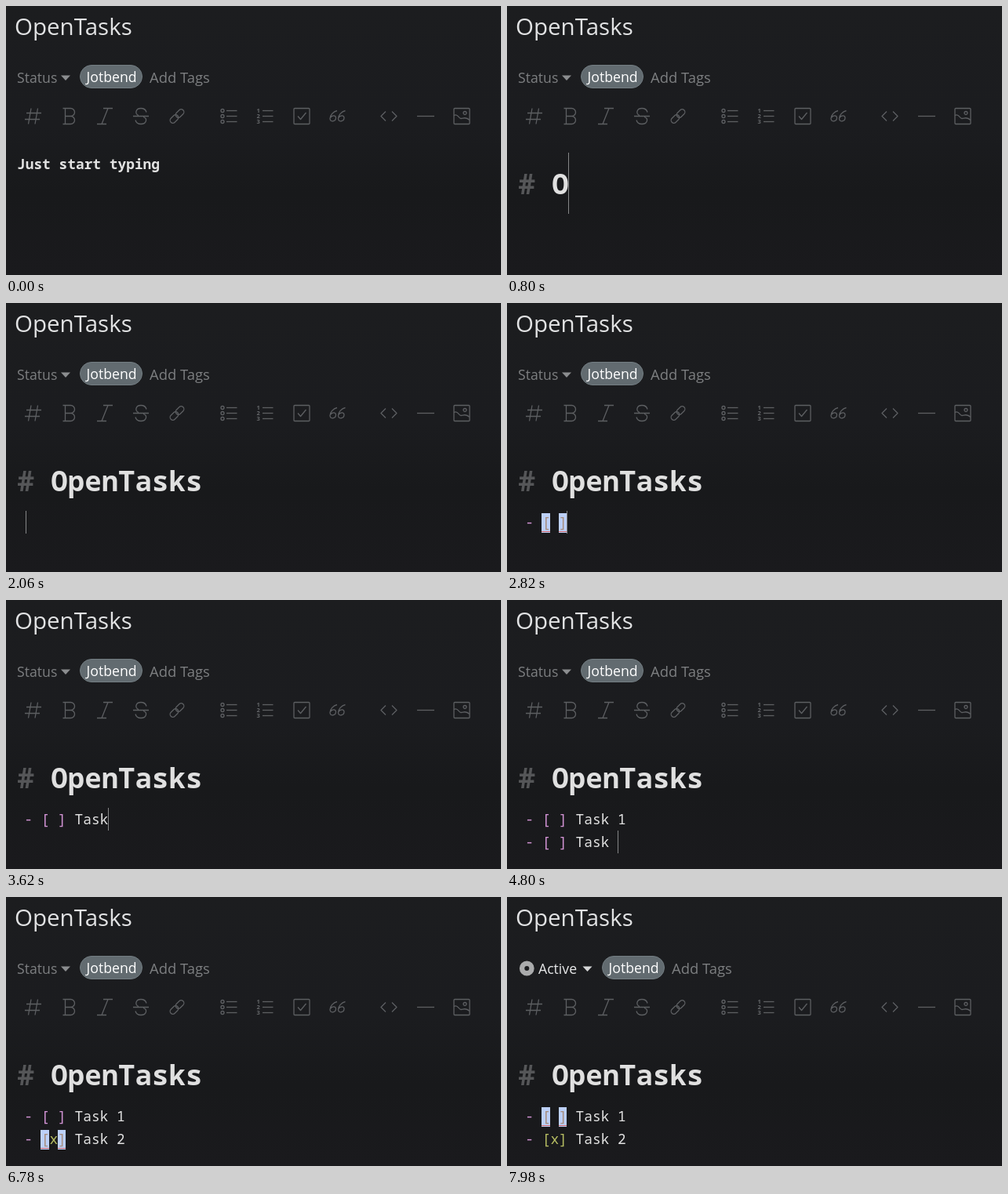
These frames come from a looping animation (631x343 px, 8000 ms). An HTML page:

```html
<!DOCTYPE html>
<html lang="en">
<head>
<meta charset="utf-8">
<title>Task note</title>
<style>
  html, body { margin: 0; width: 100%; height: 100%; overflow: hidden; background: #1a1b1d; }
  svg { display: block; width: 631px; height: 343px; }
  text { font-family: "Open Sans", "Noto Sans", sans-serif; font-size: 17.7px; white-space: pre; }
  .title { font-size: 29.5px; fill: #e1e2e3; }
  .muted { fill: #7d7f81; }
  .add { font-size: 18.4px; }
  .chip { font-weight: 500; fill: #fff; }
  .bright { fill: #e6e7e8; }
  .mono text { font-family: "Noto Sans Mono", "DejaVu Sans Mono", monospace; font-size: 17.85px; font-weight: 500; fill: #e2e2e2; }
  .mono .hint { font-weight: 600; }
  .mono .heading { font-size: 35.75px; font-weight: 700; fill: #e0e0e0; }
  .mono .mark { fill: #555658; }
  .mono .bullet { fill: #d293d4; }
  .mono .done { fill: #b6bd62; }
  .mono .matched { fill: #a68c7c; }
  .icons { fill: none; stroke: #5d5f62; stroke-width: 1.3; stroke-linejoin: round; }
  .icons text { font-size: 7.5px; font-weight: 700; fill: #66686b; stroke: none; }
</style>
</head>
<body>
<svg viewBox="0 0 631 343">
  <defs>
    <linearGradient id="paper" x2="0" y2="1">
      <stop offset="0" stop-color="#1c1d1f"/>
      <stop offset=".45" stop-color="#1b1c1f"/>
      <stop offset=".7" stop-color="#18191b"/>
      <stop offset="1" stop-color="#1a1a1d"/>
    </linearGradient>
  </defs>
  <rect width="631" height="343" fill="url(#paper)"/>
  <text class="title" x="11" y="36.5">OpenTasks</text>
  <g id="status"></g>
  <g id="tags">
    <rect x="94.5" y="75.5" width="79" height="29" rx="14.5" fill="#626b70" stroke="#737d82"/>
    <text class="chip" x="102.5" y="97">Jotbend</text>
    <text class="muted add" x="183" y="98">Add Tags</text>
  </g>
  <g class="icons" id="icons"></g>
  <g class="mono" id="editor"></g>
</svg>
<script>
const LOOP = 8000;
const $ = id => document.getElementById(id);

const box = '<rect x="-10" y="-10" width="20" height="20" rx="1"/>';
const path = d => `<path d="${d}"/>`;
const rows = draw => [-7, 0, 7].map((y, i) => path(`M-3 ${y}H10.5`) + draw(y, i + 1)).join("");
const six = x => path(`M${x} -7c-5 1 -9 6 -9 10c0 5 7.500 4 7.500 -1c0 -4 -5.500 -3 -7 0`);
const link = x => `<rect x="${x}" y="-3.5" width="12" height="7" rx="3.5"/>`;

const icons = [
  [34, path("M-2 -10L-5.5 10M6.5 -10L3 10M-8 -4H11M-10 4H9")],
  [80.5, path("M-8 -10H2a5 5 0 0 1 0 10H-5M2 0a5 5 0 0 1 0 10H-8M-5 -10V10")],
  [126, path("M-2 -10H10M-10 10H2M4 -10L-4 10")],
  [172, path("M-10 0H10M7 -5C6 -9 3 -10 0 -10C-7 -10 -8 -3 -3 -1M3 1C9 3 7 10 0 10C-4 10 -6 9 -7 5")],
  [218, `<g transform="rotate(-45)">${link(-11)}${link(-1)}</g>`],
  [284, rows(y => `<circle cx="-8" cy="${y}" r="2"/>`)],
  [330, rows((y, n) => `<text x="-10.5" y="${y + 2.7}">${n}</text>`)],
  [377, box + path("M-5 0L-1.5 4L5.5 -4.5")],
  [423, six(-1) + six(9.5)],
  [488, path("M-4 -6L-10 0L-4 6M4 -6L10 0L4 6")],
  [535, path("M-11 0H11")],
  [581, box + '<circle cx="4" cy="-4" r="2"/>' + path("M-10 -1C-5 -4 -4 3 -1 3S5 0 10 5")],
];
$("icons").innerHTML = icons.map(([x, art]) => `<g transform="translate(${x} 140.5)">${art}</g>`).join("");

// Edits: time, line, new text, caret column (defaults to the end of the text).
const edits = [[100, 0, ""]];
const type = (line, start, chars, times) =>
  times.forEach((t, i) => edits.push([t, line, start + chars.slice(0, i + 1)]));

type(0, "", "# OpenTasks", [400, 580, 800, 880, 960, 1040, 1200, 1300, 1420, 1560, 1620]);
edits.push([1900, 1, ""]);
type(1, "", " - [ ] ", [2060, 2220, 2300, 2580, 2680, 2820, 2940]);
type(1, " - [ ] ", "Task 1", [3360, 3460, 3540, 3620, 3680, 3800]);
edits.push([4000, 2, " - [ ] "]);
type(2, " - [ ] ", "Task 2", [4340, 4440, 4560, 4680, 4800, 4920]);
edits.push(
  [5360, 2, " - [ ] Task 2", 12],
  [5440, 2, " - [ ] Task 2", 7],
  [5660, 2, " - [ ] Task 2", 5],
  [6020, 2, " - [] Task 2", 4],
  [6420, 2, " - [x] Task 2", 5],
  [7660, 1, " - [ ] Task 1", 5],
);

const caretHidden = [[0, 100], [3260, 3360], [5260, 5360], [6000, 6020], [6320, 6420],
                     [6780, 7060], [7380, 7660], [7980, LOOP]];
const ACTIVE_AT = 6960;

const headX = col => 14.4 + 21.45 * col;
const rowX = col => col < 3 ? 14.3 + 10.7 * col : 44.7 + 10.7 * (col - 3);
const label = (x, y, cls, str) => str ? `<text class="${cls}" x="${x}" y="${y}">${str}</text>` : "";

function taskRow(str, top, caretCol) {
  const y = top + 21;
  const open = str.indexOf("["), close = str.indexOf("]");
  const matched = close > 0 && [open, open + 1, close, close + 1].includes(caretCol);
  const end = close < 0 ? str.length : close + 1;
  const tone = /\[x\] /.test(str) ? "done" : /\[ \] /.test(str) ? "bullet" : "";
  let art = label(23.3, y, "bullet", str.slice(1, 2));
  for (let col = 3; col < end; col++) {
    const lit = matched && (col === open || col === close);
    const x = rowX(col);
    if (lit) {
      const left = Math.floor(x), width = Math.floor(rowX(col + 1)) - left;
      art += `<rect x="${left}" y="${top + 3}" width="${width}" height="25" fill="#bcd0f8"/>` +
             `<rect x="${left}" y="${top + 26}" width="${width}" height="1" fill="#d4686c"/>`;
    }
    art += label(x, y, lit ? "matched" : tone, str[col]);
  }
  return art + label(rowX(end), y, "", str.slice(end));
}

function drawEditor(t) {
  const lines = ["", "", ""];
  let line = 0, col = 0;
  for (const [at, row, str, caret = str.length] of edits) {
    if (at > t) break;
    lines[row] = str;
    line = row;
    col = caret;
  }
  let art = lines[0]
    ? label(headX(0), 239.5, "heading mark", "#") + label(headX(2), 239.5, "heading", lines[0].slice(2))
    : label(14, 208, "hint", "Just start typing");
  for (const row of [1, 2]) art += taskRow(lines[row], 236 + 29 * row, row === line ? col : -1);

  if (!caretHidden.some(([from, to]) => t >= from && t < to)) {
    const x = Math.floor(line ? rowX(col) : headX(col));
    const top = line ? 236 + 29 * line : 187;
    const height = line || !lines[0] ? 29 : 78;
    art += `<rect x="${x}" y="${top}" width="1" height="${height}" fill="#858687"/>`;
  }
  return art;
}

function drawStatus(active) {
  const arrow = x => `<path d="M${x} 88.5h12l-6 6.500z" fill="${active ? "#d6d7d8" : "#8b8d8f"}"/>`;
  return active
    ? '<circle cx="25.3" cy="91" r="6.2" fill="none" stroke="#aaabac" stroke-width="6.4"/>' +
      label(40, 98, "bright", "Active") + arrow(96.5)
    : label(14, 98, "muted", "Status") + arrow(70);
}

const moments = [...new Set([0, ACTIVE_AT, ...edits.map(e => e[0]), ...caretHidden.flat()])]
  .sort((a, b) => a - b);
let shown = -1;

function frame() {
  const t = performance.now() % LOOP;
  const now = moments.filter(m => m <= t).pop();
  if (now !== shown) {
    shown = now;
    const active = now >= ACTIVE_AT;
    $("status").innerHTML = drawStatus(active);
    $("tags").setAttribute("transform", `translate(${active ? 27 : 0})`);
    $("editor").innerHTML = drawEditor(now);
  }
  requestAnimationFrame(frame);
}
frame();
</script>
</body>
</html>
```
